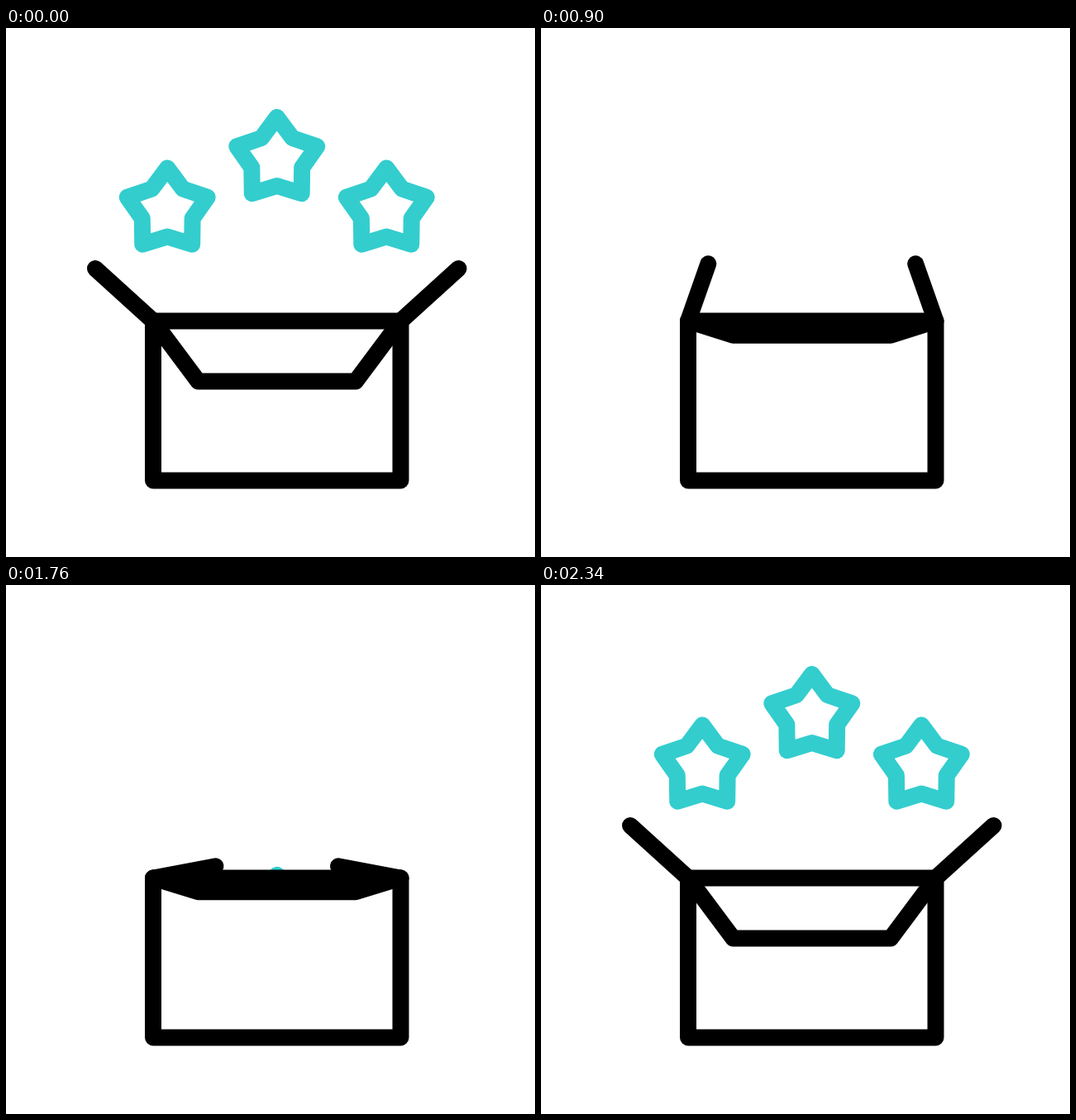
An HTML page with a canvas for the animation above (2400 ms loop, 640x640 px).

```html
<!DOCTYPE html>
<html lang="en">
<head>
<meta charset="utf-8">
<title>Box of stars</title>
<style>
  html, body { margin: 0; width: 100%; height: 100%; overflow: hidden; background: #fff; }
  canvas { display: block; }
</style>
</head>
<body>
<canvas id="stage" width="640" height="640"></canvas>
<script>
const ctx = document.getElementById('stage').getContext('2d');
const LOOP = 2400;
const TEAL = '#33cdce';
const LEFT = 178, RIGHT = 477.5, TOP = 354.5, BOTTOM = 547.5;
const MID = (LEFT + RIGHT) / 2;

// time, flap tip x, flap tip y, front flap y
const FLAPS = [
  [660, 108, 291, 427.5],
  [1125, 290, 280, 320],
  [1400, MID, TOP, TOP],
  [1610, MID, TOP, TOP],
  [1760, 254, 340.5, 371],
  [2050, 108, 291, 427.5]
];

const clamp = v => Math.min(1, Math.max(0, v));
const progress = (t, from, to) => clamp((t - from) / (to - from));
const mix = (a, b, p) => a + (b - a) * p;
const mirror = x => 2 * MID - x;

function poseAt(keys, t) {
  const next = keys.findIndex(key => key[0] > t);
  if (next <= 0) return keys[next < 0 ? keys.length - 1 : 0].slice(1);
  const a = keys[next - 1], b = keys[next];
  const p = progress(t, a[0], b[0]);
  return a.slice(1).map((v, i) => mix(v, b[i + 1], p));
}

function stroke(points, color, closed) {
  ctx.beginPath();
  points.forEach(([x, y]) => ctx.lineTo(x, y));
  if (closed) ctx.closePath();
  ctx.strokeStyle = color;
  ctx.stroke();
}

function drawStar(x, y, radius) {
  const points = Array.from({ length: 10 }, (_, i) => {
    const r = i % 2 ? radius * 0.627 : radius;
    const angle = i * Math.PI / 5;
    return [x + r * Math.sin(angle), y - r * Math.cos(angle)];
  });
  stroke(points, TEAL, true);
}

// How far the stars have sunk: 0 is fully risen
function starDepth(t) {
  if (t > 1600) return Math.max(0, (2216 - t) * 0.00597);
  const s = Math.max(0, t - 66) / 1000;
  return 4.5 * s + 0.8 * s * s;
}

function drawStars(t) {
  const depth = starDepth(t);
  if (depth > 3.2) return;
  const radius = 51 - 7.4 * depth;
  const x = 195.2 + 20.3 * depth, y = 220.5 + 72.6 * depth;
  ctx.save();
  ctx.beginPath();
  ctx.rect(0, 0, 640, TOP);
  ctx.clip();
  drawStar(MID, 159 + 82 * depth, radius);
  drawStar(x, y, radius);
  drawStar(mirror(x), y, radius);
  ctx.restore();
}

function drawSparks(t) {
  const head = progress(t, 1927, 2130), tail = progress(t, 2130, 2330);
  if (head === 0 || tail === 1) return;
  const at = p => [mix(207, 166, p), mix(113, 72.5, p)];
  const line = [at(tail), at(head)];
  stroke(line, TEAL);
  stroke(line.map(([x, y]) => [mirror(x), y]), TEAL);
}

function drawBox(t) {
  const [tipX, tipY, frontY] = poseAt(FLAPS, t);
  stroke([[LEFT, TOP], [RIGHT, TOP], [RIGHT, BOTTOM], [LEFT, BOTTOM]], '#000', true);
  stroke([[LEFT, TOP], [232.5, frontY], [mirror(232.5), frontY], [RIGHT, TOP]], '#000');
  stroke([[LEFT, TOP], [tipX, tipY]], '#000');
  stroke([[RIGHT, TOP], [mirror(tipX), tipY]], '#000');
}

function draw() {
  const t = performance.now() % LOOP;
  ctx.fillStyle = '#fff';
  ctx.fillRect(0, 0, 640, 640);
  ctx.lineWidth = 20;
  ctx.lineCap = ctx.lineJoin = 'round';
  drawStars(t);
  drawSparks(t);
  drawBox(t);
  requestAnimationFrame(draw);
}
draw();
</script>
</body>
</html>
```
